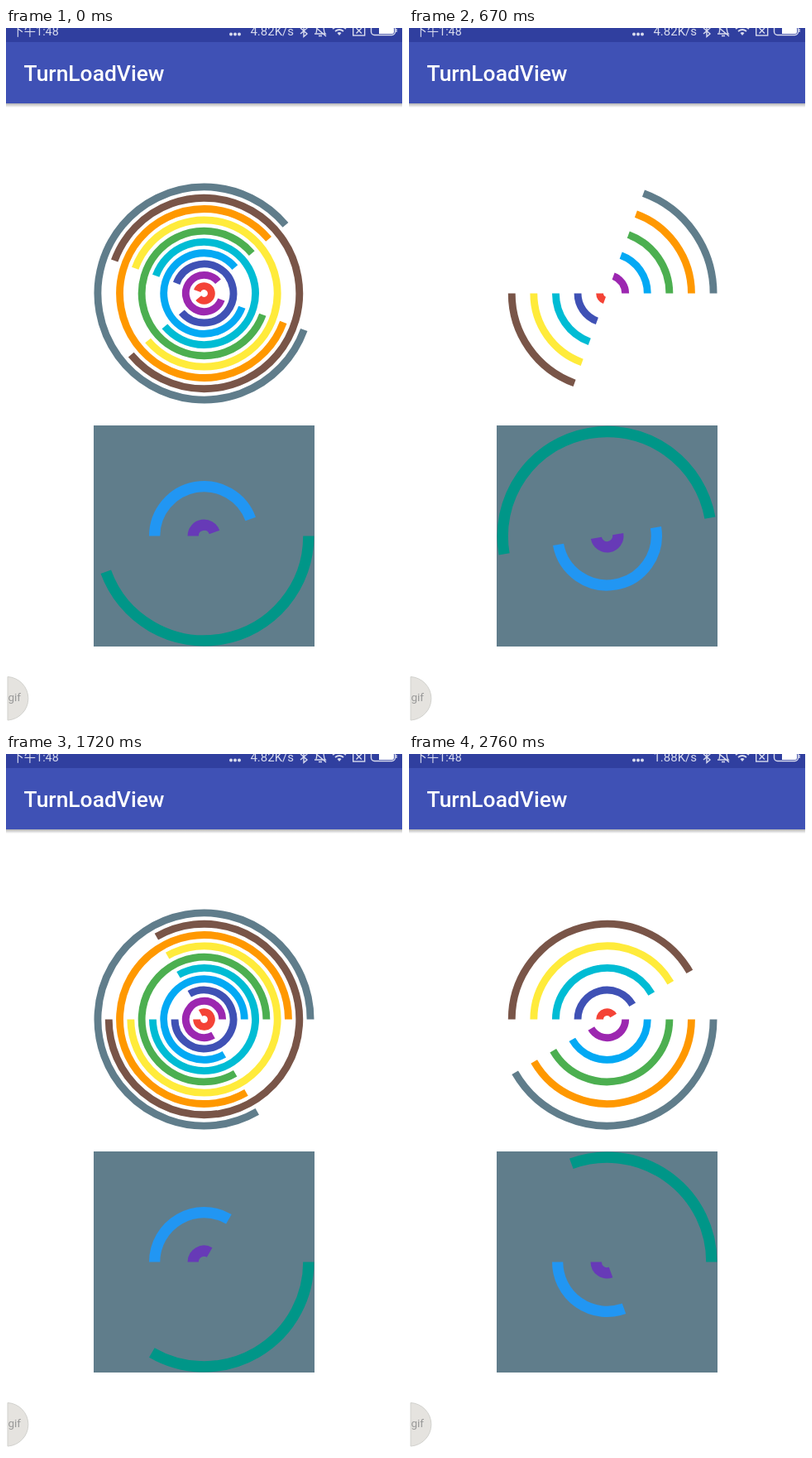
Recreate the animation shown at these times as an HTML page. Size 480 by 843 pixels, loop 2860 ms.

```html
<!DOCTYPE html>
<html lang="en">
<head>
<meta charset="utf-8">
<title>TurnLoadView</title>
<style>
  html, body { margin: 0; width: 100%; height: 100%; overflow: hidden; background: #fff; }
  svg { display: block; width: 100vw; height: 100vh; }
  text { font-family: Roboto, "Noto Sans CJK SC", "Noto Sans CJK", sans-serif; }
</style>
</head>
<body>
<svg viewBox="0 0 480 843">
  <defs>
    <linearGradient id="shade" x1="0" y1="0" x2="0" y2="1">
      <stop offset="0" stop-color="#000" stop-opacity=".3"/>
      <stop offset="1" stop-color="#000" stop-opacity="0"/>
    </linearGradient>
  </defs>

  <rect y="91" width="479" height="5" fill="url(#shade)"/>
  <rect width="479" height="91" fill="#3f51b5"/>
  <rect width="479" height="17" fill="#303f9f"/>
  <text x="21.5" y="64" font-size="26.4" font-weight="500" fill="#fff">TurnLoadView</text>

  <!-- status bar -->
  <g fill="#d9dcee" font-size="14.3">
    <text x="7.500" y="9">下午1:48</text>
    <text id="speed" x="348" y="9" font-size="15" text-anchor="end">4.82K/s</text>
    <circle cx="272" cy="7.5" r="2"/>
    <circle cx="277" cy="7.5" r="2"/>
    <circle cx="282" cy="7.5" r="2"/>
  </g>
  <g fill="none" stroke="#d9dcee" stroke-width="1.4">
    <path d="M356 0L364 7L360 10.500V-3L364 0L356 7"/>
    <path d="M373 7H386C384 5 384.500 2 384 -1M375 6C376 4 375.500 1 376 -1M378 9.500H382M373 -2L387 10"/>
    <path d="M395 1Q403 -5 411 1M398 4Q403 0 408 4" stroke-width="1.8"/>
    <path d="M400.500 6Q403 4 405.500 6L403 9Z" fill="#d9dcee" stroke="none"/>
    <rect x="419.700" y="-3" width="14" height="12"/>
    <path d="M423.500 0L430 6.500M430 0L423.500 6.500"/>
    <rect x="441.500" y="-3" width="29" height="11.500" rx="4"/>
    <path d="M451 -1H467Q469 -1 469 1V5Q469 7 467 7H451Z" fill="#fff" stroke="none"/>
    <path d="M472 1V5"/>
  </g>

  <!-- floating button -->
  <path d="M2 783.500A26.500 26.300 0 0 1 2 836Z" fill="#e5e3df" stroke="#d2d2ce" stroke-width="1"/>
  <text x="2.500" y="813" font-size="13.500" fill="#999">gif</text>

  <rect x="106" y="480" width="267" height="267" fill="#607d8b"/>
  <g id="arcs" fill="none"></g>
</svg>
<script>
const LOOP = 2860, STEPS = 30, CX = 239.5, U = 13.3;

function makeArc(cy, r, width, color, turn) {
  const el = document.createElementNS("http://www.w3.org/2000/svg", "path");
  el.setAttribute("stroke", color);
  el.setAttribute("stroke-width", width);
  document.getElementById("arcs").append(el);
  return { el, cy, r, turn };
}

const rings = ["#607d8b", "#795548", "#ff9800", "#ffeb3b", "#4caf50",
  "#00bcd4", "#03a9f4", "#3f51b5", "#9c27b0", "#f44336"]
  .map((c, i) => makeArc(320.5, U * (10 - i) - U / 3, U * 2 / 3, c, i % 2 * 180));

const bows = [
  makeArc(613.5, U * 9.5, U, "#009688", 0),
  makeArc(613.5, U * 4.5, U, "#2196f3", 180),
  makeArc(613.5, U, U, "#673ab7", 180)
];

function drawArc({ el, cy, r, turn }, from, to) {
  const at = deg => {
    const a = (deg + turn) * Math.PI / 180;
    return `${(CX + r * Math.cos(a)).toFixed(2)} ${(cy + r * Math.sin(a)).toFixed(2)}`;
  };
  el.setAttribute("d", to > from
    ? `M${at(from)}A${r} ${r} 0 ${to - from > 180 ? 1 : 0} 1 ${at(to)}` : "");
}

// The head runs to a full turn; the tail follows "span" degrees behind.
// Arcs move in ticks of 10 degrees.
function spin(arcs, travel, span) {
  const p = Math.round(travel / 10) * 10 % (360 + span);
  for (const arc of arcs) drawArc(arc, Math.max(0, p - span), Math.min(p, 360));
}

// Rings slow down a little around mid-cycle.
function ringTravel(step) {
  const even = 321 + 39.15 * step;
  return even + 16 * Math.sin(even / 660 * 2 * Math.PI);
}

const speed = document.getElementById("speed");

function render(ms) {
  // The screen refreshes in even steps, slightly ahead of the clock.
  const step = Math.min(STEPS - 1, Math.floor((ms + 6) / LOOP * STEPS));
  spin(rings, ringTravel(step), 300);
  spin(bows, 160 + 27.85 * step, 180);
  speed.textContent = step < 21 ? "4.82K/s" : "1.88K/s";
}

const start = performance.now();
function loop() {
  render((performance.now() - start) % LOOP);
  requestAnimationFrame(loop);
}
loop();
</script>
</body>
</html>
```
